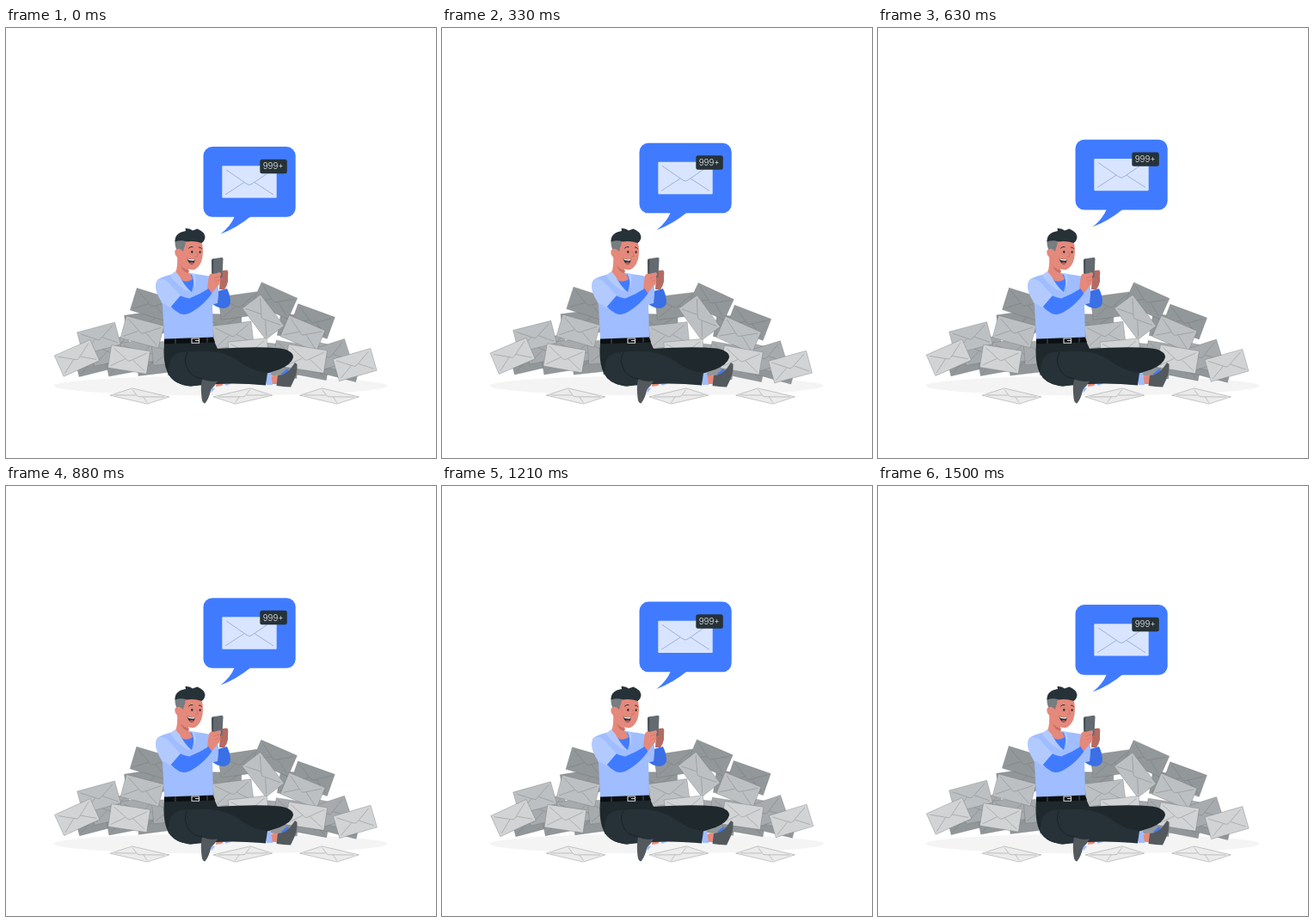
Recreate the animation shown at these times as an HTML page. Size 500 by 500 pixels, loop 1540 ms.

```html
<!DOCTYPE html>
<html lang="en">
<head>
<meta charset="utf-8">
<title>Unread mail</title>
<style>
html, body { margin: 0; width: 100%; height: 100%; overflow: hidden; background: #fff; }
svg { display: block; width: 100vw; height: 100vh; }
.env { stroke: #6b6d6f; stroke-opacity: .55; stroke-width: .6; stroke-linejoin: round; }
.fold { fill: none; }
.skin { fill: #e4897b; }
.shade { fill: #b56b61; }
.blue { fill: #407bff; }
.pale { fill: #a0bdff; }
.light { fill: #b3caff; }
.ink { fill: #263238; }
.deep { fill: #1f282c; }
.shoe { fill: #53595d; }
</style>
</head>
<body>
<svg viewBox="0 0 500 500">
  <ellipse cx="249.5" cy="416" rx="194" ry="11.3" fill="#f4f4f4"/>
  <g id="pile"></g>
  <g id="floor"></g>

  <g id="man">
    <!-- far arm -->
    <path fill="#3a6fe6" d="M246 306 L257 303 Q261 311 261 319 Q260 326 252 326 Q244 325 238 319 Z"/>
    <path class="pale" d="M217 286 Q236 287 244 292 Q249 301 246 320 L238 322 Z"/>
    <path class="shade" d="M249 287 L252 282 L257 281.5 Q259 283 258 288 L258 295 Q257 300 254 304 L248 304 Z"/>
    <!-- feet -->
    <path class="skin" d="M245 411 L254 412 L251 416 L244 417 Z"/>
    <path class="pale" d="M252 411 L263 413 L256 416 Z M237 418 L243 419 L239 424 Z"/>
    <path class="skin" d="M307 405 L317 403 L317 414 L308 414 Z"/>
    <path class="pale" d="M302 401 L308 401 L310 415 L303 415 Z"/>
    <path class="blue" d="M320 402 L327 396 L329 399 L322 404 Z"/>
    <path class="shoe" d="M316 404 Q326 403 331 396 L336 389 L338.5 391 Q339 401 335 409 L331 417.5 Q323 417 314.5 416 Z"/>
    <!-- trousers -->
    <path class="deep" d="M184 366 L242 364 L246 373 Q290 370 319 372.5 Q334 375 334 383 Q332 391 318 397 L296 404 L215 416.5 Q195 415 188 401 Q182 389 184 366 Z"/>
    <path class="ink" d="M190 391 Q191 377 211 376.5 Q232 375 246 377 Q264 381 276 391 Q288 399 304 401 L302 415.5 Q258 411 215 416.5 Q195 415 188 401 Z"/>
    <path fill="none" stroke="#182024" stroke-width=".9" d="M211 377 Q205 387 213 400 Q219 407 229 408"/>
    <path class="shoe" d="M228 408.5 Q237 412 246 410.5 Q243 416 238.5 420 Q236 431 231.5 436.5 Q228 436 227.5 430 Q226 418 228 408.5 Z"/>
    <!-- shirt and belt -->
    <path class="pale" d="M199 285 Q180 289 176 293 Q173 298 175 305 L182 322 L184 362 L241 361 L240 319 Q242 304 238 293 Q230 288 215 285 Z"/>
    <path fill="#0b0f11" d="M184 361.5 L241 359.5 L243 365.5 L184 367.3 Z"/>
    <path fill="none" stroke="#d9dcde" stroke-width="1.1" d="M216 361 h8.5 v5.2 h-8.5 Z M220 363.5 h4"/>
    <path stroke="#59636a" stroke-width=".9" d="M197 361 v6 M234 360 v5.5"/>
    <!-- collar and neck -->
    <path class="blue" d="M201 286 L218 287 Q219 298 216 307 Q207 300 201 286 Z"/>
    <path class="skin" d="M199 262 L213 274 L212 284 Q216 288 217 292 Q210 297 204 293 Q198 289 197 284 Q200 279 199 262 Z"/>
    <path fill="#c56f64" d="M203 276 Q207 281 213 282 L212 285 Q205 283 203 276 Z"/>
    <path class="light" d="M197 283 Q193 285 191 288 Q199 301 215 308 Q205 297 202 289 Z M216 287 L219 285 Q222 292 219 303 Q219 293 216 287 Z"/>
    <!-- head -->
    <path class="skin" d="M203 249 Q216 244 227 248 Q230 255 228.5 266 Q227 277 219 281 Q211 282 206 276 Q201 268 203 249 Z"/>
    <path fill="#777d80" d="M196.5 247 L209 246 Q209 252 207 256 L205.500 262 L200 262 Q196 254 196.5 247 Z"/>
    <path class="skin" d="M206 260 Q202 255 197.5 257.5 Q194.5 261 198.5 266 Q202 270 206 267 Z"/>
    <path class="ink" d="M196.5 248.5 Q196 238 209 236 L208.5 233 Q214 232.5 217 235.5 L222.5 233.5 Q231 237 231.5 243 Q231 248 227.5 250 Q219 247 210 248.5 Q204 246 196.5 248.5 Z"/>
    <g fill="none" stroke="#263238" stroke-linecap="round">
      <path d="M212.5 256 Q214.5 253.7 217 254.5 M224.5 255 Q226.5 254.5 227.5 256.5"/>
      <path stroke="#c96f63" stroke-width=".8" d="M221 260 Q224 264 223 265.5 L220.500 265.5"/>
    </g>
    <ellipse class="ink" cx="216.3" cy="260.3" rx="1.1" ry="1.6"/>
    <ellipse class="ink" cx="225.6" cy="260.6" rx="1" ry="1.5"/>
    <path class="ink" d="M210.5 267.5 Q215 270 219.8 268.5 Q219.5 274 216 275 Q211.5 273.5 210.5 267.5 Z"/>
    <path fill="#fff" d="M211 268 Q215 270 219.6 268.8 L219 270.3 Q215 271 211.6 269.5 Z"/>
    <path fill="#d95d55" d="M213 273 Q216 271.5 218.5 273 Q217 275 216 274.8 Z"/>
    <!-- near arm and phone -->
    <path fill="#636b70" d="M239 270 Q239 268.5 241 268.2 L251 266.8 Q252.5 267 252.5 268.5 L251.5 290 L239.5 292 Z"/>
    <path fill="#455056" d="M239 270 L241.5 268.3 L241 291 L239.5 292 Z"/>
    <path class="skin" d="M234 304 Q235 294 236 288 Q239 284 241 286 L249 284 Q251 286 249 289 Q250 294 248 298 Q245 301 240 308 Z"/>
    <path fill="none" stroke="#c96f63" stroke-width=".6" d="M242 291 L248 289 M243 295 L248 293"/>
    <path class="blue" d="M191 323 L202 311 Q208 314 213 314.5 Q225 310 235.5 303 L239.5 308.5 Q231 321 218 329 Q209 335 202 332 Q196 329 191 323 Z"/>
    <path class="light" d="M176 293 Q184 290 190 297 L203 311 L191 325 L182 320 Q174 309 174 300 Z"/>
  </g>

  <g id="bubble">
    <path class="blue" d="M266 219 Q261 231 249.5 239.7 Q268 233 285 219 Z"/>
    <rect class="blue" x="229.5" y="138.3" width="107.2" height="81.7" rx="10.5"/>
    <rect x="251.3" y="160.5" width="63.4" height="37.3" rx="1" fill="#d9e5ff"/>
    <path fill="none" stroke="#9fb1da" d="M256 165 L280 181.500 Q283 184 286 181.500 L310 165 M255 194 L277 179.7 M311 194 L289 179.7"/>
    <rect class="ink" x="295.3" y="153" width="31.5" height="16.4" rx="2.5"/>
    <text x="298.7" y="164.7" font-family="Inter, sans-serif" font-weight="300" font-size="9.8" fill="#f2f2f2">999+</text>
  </g>
</svg>
<script>
const $ = id => document.getElementById(id);
const shades = ['#92979a', '#a7abad', '#bdc0c2', '#d1d3d4'];
const MID = 244.5;

const letter = (fill, transform) => `
  <g class="env" transform="${transform}">
    <path fill="${fill}" d="M-22.7 -13.3 h45.4 v26.6 h-45.4 Z"/>
    <path class="fold" d="M-19.5 -10.5 L-2 1 Q0 2.5 2 1 L19.5 -10.5 M-20 10.5 L-4.5 0 M20 10.5 L4.5 0"/>
  </g>`;
const place = (x, y, turn, shade) =>
  letter(shades[shade], `translate(${x} ${y}) rotate(${turn})`);

// Row of letters that fan outwards from the middle
const row = (from, to, count, y, shade) => Array.from({ length: count }, (_, i) => {
  const x = from + (to - from) * i / (count - 1);
  return place(x, y + (x - MID) * .02, (x - MID) / 10, shade);
}).join('');

// Letters on top, one layer per shade: x, y, turn
const layers = [
  [[170, 322, 17], [271, 323, -8], [312.5, 317, 24], [356.5, 341, 20]],
  [[376, 381, -18]],
  [[108, 361, -15], [158.5, 353.5, 15], [299, 336, 53], [345, 355, 23], [264, 357, -7]],
  [[82.5, 384, -24], [143, 385.5, 9], [282, 376, -6], [349, 384.5, 9], [405.7, 391.5, -16]]
];

$('pile').innerHTML =
  row(162, 340, 3, 346, 0) + row(104, 388, 9, 390, 0) + row(122, 370, 8, 378, 1) +
  layers.map((list, shade) => list.map(p => place(...p, shade)).join('')).join('');

// Letters lying flat, every other one mirrored
$('floor').innerHTML = [155.5, 275.3, 376].map((x, i) =>
  letter('#ebebeb', `translate(${x} 428) scale(${i % 2 ? 1 : -1} 1) matrix(.95 -.22 .96 .31 0 0)`)
).join('');

const LOOP = 1540, CYCLE = 1500, TICK = 1000 / 24, LEAD = 15;

// Linear sway: 0, +1 at a quarter, -1 at three quarters
const sway = p => p < .25 ? p * 4 : p < .75 ? 2 - p * 4 : p * 4 - 4;

function draw(now) {
  const tick = Math.floor((now % LOOP + 4.9) / TICK);
  const p = (tick * TICK + LEAD) % CYCLE / CYCLE;
  const lift = 10 * (1 - Math.abs(1 - 2 * p));
  $('bubble').setAttribute('transform', `translate(0 ${-lift})`);
  $('pile').setAttribute('transform', `rotate(${sway(p)} ${MID} 354)`);
}

const start = performance.now();
function run() {
  draw(performance.now() - start);
  requestAnimationFrame(run);
}
run();
</script>
</body>
</html>
```
